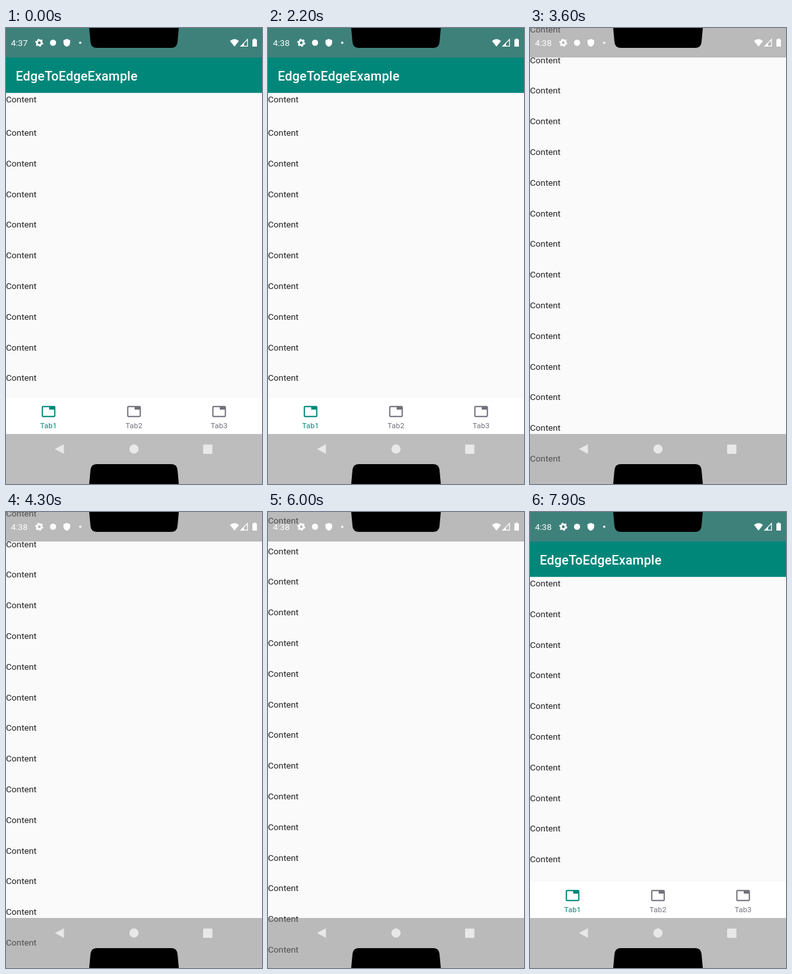
Write an HTML page that moves like this. It is 400x711 px and loops after 8 s.

```html
<!DOCTYPE html>
<html lang="en">
<head>
<meta charset="utf-8">
<title>Edge to edge scrolling</title>
<style>
  html, body { margin: 0; width: 100%; height: 100%; overflow: hidden; }
  svg { display: block; width: 100vw; height: 100vh; font-family: Roboto, sans-serif; }
  .title { font-size: 20px; font-weight: 500; letter-spacing: .18px; fill: #fff; }
  .item { font-size: 13.62px; fill: #212121; }
  .tab { font-size: 11.7px; letter-spacing: .2px; text-anchor: middle; }
  .clock { font-size: 13.6px; }
</style>
</head>
<body>
<svg viewBox="0 0 400 711">
  <rect width="400" height="711" fill="#fafafa"/>
  <g id="list"></g>

  <g id="topBar">
    <rect width="400" height="101.2" fill="#01877a"/>
    <text class="title" x="15.3" y="82">EdgeToEdgeExample</text>
  </g>

  <g id="bottomBar">
    <rect y="577" width="400" height="134" fill="#fff"/>
  </g>

  <g fill="#7d7d7d" fill-opacity=".5">
    <rect width="400" height="46"/>
    <rect y="633" width="400" height="78"/>
  </g>

  <!-- system buttons -->
  <g fill="#e8e8e8">
    <path d="M76.5 656.5L90.5 649V664Z"/>
    <circle cx="200" cy="656.5" r="7.2"/>
    <rect x="308" y="649.5" width="14.5" height="14.5" rx="1.2"/>
  </g>

  <!-- status icons -->
  <g fill="#fff">
    <text id="clock" class="clock" x="7.7" y="28"></text>
    <g fill="none" stroke="#fff">
      <circle cx="52" cy="23" r="3.6" stroke-width="2.8"/>
      <circle cx="52" cy="23" r="5.4" stroke-width="1.8" pathLength="12" stroke-dasharray="1 1"/>
    </g>
    <circle cx="73.5" cy="23" r="4.8"/>
    <path d="M95 17l5.2 2v4c0 3-2.2 5.3-5.2 6.3c-3-1-5.2-3.3-5.2-6.3v-4z"/>
    <circle cx="116" cy="23" r="1.8"/>
    <path d="M357 29L350 20.3Q357 14.2 364 20.3Z"/>
    <path d="M366.8 28.4H377.4V17.8Z" fill="none" stroke="#fff" stroke-width="1.2"/>
    <path d="M366 29H372V23Z"/>
    <path d="M387 16.5h3v1.2h2v11.3h-7v-11.3h2z"/>
  </g>

  <!-- display cutouts -->
  <path d="M130 0L132 22Q133 31 142 31H258Q267 31 268 22L270 0Z"/>
  <path d="M130 711L132 689Q133 680 142 680H258Q267 680 268 689L270 711Z"/>
</svg>
<script>
const LOOP = 8000, STEP = 100;
const ROWS = 20, ROW_H = 47.8;
const TOP_H = 101.2, BOTTOM_H = 132;
const RETURN_RATE = 1.125;        // bars come back slightly faster than the list
const TAB_ICON = 'M21 3H3c-1.1 0-2 .9-2 2v14c0 1.1.9 2 2 2h18c1.1 0 2-.9 2-2V5c0-1.1-.9-2-2-2zm0 16H3V5h10v4h8v10z';

// Flings: [start, end, distance, ease-out power]
const down = [
  [2700, 3600, 304.6, 2.55],
  [4800, 5200, 36.8, 2]
];
const back = [
  [7100, 7900, 241.6, 2.8]
];

const $ = id => document.getElementById(id);
const clamp = (v, lo, hi) => Math.min(hi, Math.max(lo, v));
const progress = (t, a, b) => clamp((t - a) / (b - a), 0, 1);
const shift = (id, y) => $(id).setAttribute('transform', `translate(0 ${y.toFixed(2)})`);

function add(parent, tag, attrs, text = '') {
  const el = document.createElementNS('http://www.w3.org/2000/svg', tag);
  for (const key in attrs) el.setAttribute(key, attrs[key]);
  el.textContent = text;
  parent.append(el);
}

for (let i = 0; i < ROWS; i++) {
  const y = i ? 168 + (i - 1) * ROW_H : 116;
  add($('list'), 'text', { class: 'item', x: 0, y }, 'Content');
}

[66.5, 200, 333].forEach((x, i) => {
  const bar = $('bottomBar');
  const fill = i ? '#73707a' : '#01877a';
  add(bar, 'path', { d: TAB_ICON, fill, transform: `translate(${x} 598) scale(.973) translate(-12 -12)` });
  add(bar, 'text', { class: 'tab', x, y: 623.5, fill }, 'Tab' + (i + 1));
});

const travel = (flings, t) => flings.reduce((sum, [a, b, dist, pow]) =>
  sum + dist * (1 - (1 - progress(t, a, b)) ** pow), 0);

function draw(t) {
  const away = travel(down, t), home = travel(back, t);
  // Bars leave with the list and return as soon as it turns back.
  const hidden = h => Math.max(0, Math.min(away, h) - home * RETURN_RATE);
  shift('list', home - away);
  shift('topBar', -hidden(TOP_H));
  shift('bottomBar', hidden(BOTTOM_H));
  $('clock').textContent = t < 1200 ? '4:37' : '4:38';
}

const start = performance.now();
function tick() {
  const t = (performance.now() - start) % LOOP;
  draw(Math.floor(t / STEP) * STEP);
  requestAnimationFrame(tick);
}
tick();
</script>
</body>
</html>
```
